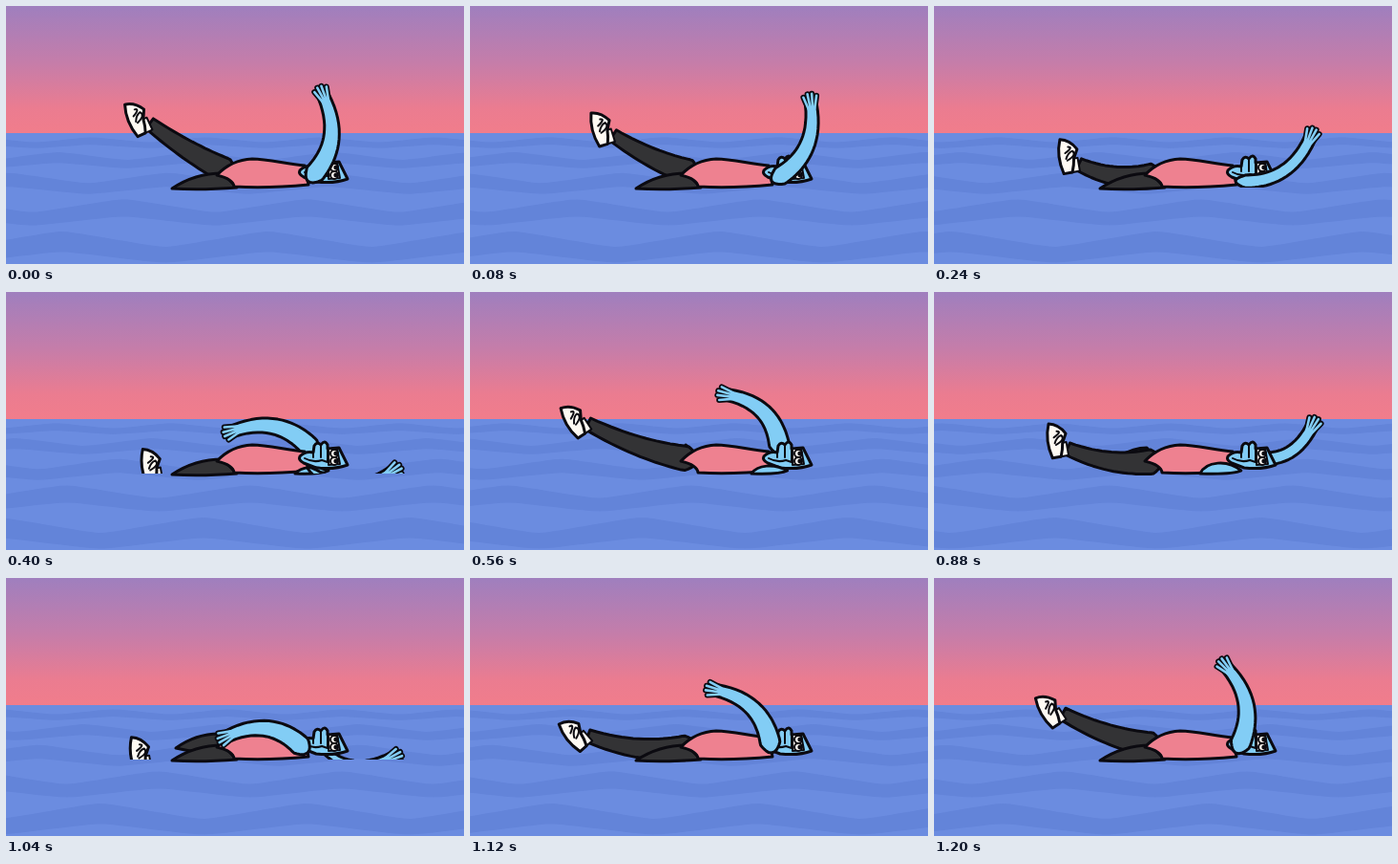
An HTML page for the animation above (1280 ms loop, 480 by 270 pixels).

```html
<!DOCTYPE html>
<html lang="en">
<head>
<meta charset="utf-8">
<title>Backstroke</title>
<style>
html, body { margin: 0; width: 100%; height: 100%; overflow: hidden; background: #6a8adf; }
svg { display: block; width: 100vw; height: 100vh; }
.ink { stroke: #0b0a10; stroke-width: 3; stroke-linejoin: round; stroke-linecap: round; }
.thin { stroke-width: 2; }
</style>
</head>
<body>
<svg viewBox="0 0 480 270" preserveAspectRatio="none">
  <defs>
    <linearGradient id="sky" x1="0" y1="0" x2="0" y2="1">
      <stop offset="0" stop-color="#9f7fbe"/>
      <stop offset=".45" stop-color="#c67da9"/>
      <stop offset=".8" stop-color="#eb7c90"/>
      <stop offset="1" stop-color="#f17d8b"/>
    </linearGradient>
    <clipPath id="air"><path d="M0 0H480V190H0Z"/></clipPath>
  </defs>
  <rect width="480" height="134" fill="url(#sky)"/>
  <rect y="133" width="480" height="137" fill="#6b8ce0"/>
  <path id="waves" fill="#6384d9"/>
  <g id="swimmer"></g>
</svg>
<script>
const STEP = 80, COUNT = 16;
const BLUE = '#82cdf5', PINK = '#ee8190', DARK = '#333335', WHITE = '#fffaf3';
const waves = document.getElementById('waves');
const swimmer = document.getElementById('swimmer');

// The far arm enters half a loop after the near one; angles are in degrees over the stroke.
const ARMS = {
  near: { start: 13, x: 316, y: 183, sweep: [[0, 170], [.25, 97], [1, -6]] },
  far: { start: 5, x: 325, y: 170, sweep: [[0, 156], [.5, 90], [.75, 26], [1, -6]] }
};
const LEGS = { near: { start: 5.5, reach: 122 }, far: { start: 13.5, reach: 110 } };

const mix = (a, b, u) => a + (b - a) * u;
const rad = deg => deg * Math.PI / 180;
const since = (start, step) => (step - start + COUNT) % COUNT;
const ink = (d, fill, more = '') => `<path class="ink ${more}" d="${d}" fill="${fill}"/>`;
const inAir = parts => `<g clip-path="url(#air)">${parts}</g>`;

function ramp(points, u) {
  const i = Math.max(1, points.findIndex(p => p[0] >= u));
  const [a, b] = [points[i - 1], points[i]];
  return mix(a[1], b[1], (u - a[0]) / (b[0] - a[0]));
}

// Outline of a quadratic curve a-c-b, round at the body end and narrowing to the tip
function taper(a, c, b, wide, slim) {
  const left = [], right = [], n = 24;
  for (let i = 0; i <= n; i++) {
    const u = (i / n) ** 1.5, v = 1 - u;
    const pos = j => v * v * a[j] + 2 * u * v * c[j] + u * u * b[j];
    const dir = j => v * (c[j] - a[j]) + u * (b[j] - c[j]);
    const r = mix(wide, slim, u) / 2 * Math.sqrt(Math.min(1, u * 10)) / Math.hypot(dir(0), dir(1));
    const x = pos(0), y = pos(1), nx = -dir(1) * r, ny = dir(0) * r;
    left.push((x + nx).toFixed(1) + ' ' + (y + ny).toFixed(1));
    right.unshift((x - nx).toFixed(1) + ' ' + (y - ny).toFixed(1));
  }
  return 'M' + left.concat(right).join('L') + 'Z';
}

// The wrist follows an ellipse; the elbow bows to the same side all the way.
function arm({ start, x, y, sweep }, step) {
  const u = since(start, step) / 8;
  if (u > 1) return '';
  const angle = ramp(sweep, u);
  const wx = 318 + 86 * Math.cos(rad(angle)), wy = 180 - 86 * Math.sin(rad(angle));
  const bow = 32 / Math.hypot(wx - x, wy - y);
  const cx = (x + wx) / 2 - (wy - y) * bow, cy = (y + wy) / 2 + (wx - x) * bow;
  const wide = 6 + 16 * Math.sin(rad(Math.max(0, Math.min(angle, 90))));
  const turn = Math.atan2(wy - cy, wx - cx) * 180 / Math.PI;

  let fingers = '';
  for (let i = -1.5; i <= 1.5; i++) fingers += `M-4 ${i * 2.2}L${12 - i * i * 1.4} ${i * 4.6}`;
  const hand = (color, w) => `<path transform="translate(${wx} ${wy}) rotate(${turn})" d="${fingers}" ` +
    `fill="none" stroke="${color}" stroke-width="${w}" stroke-linecap="round"/>`;
  return inAir(hand('#0b0a10', 6) + ink(taper([x, y], [cx, cy], [wx, wy], wide, 12), BLUE) + hand(BLUE, 2.6));
}

const kick = (leg, step) => since(leg.start, step) / 7.5;

// A quick rise, then a slower fall until only the toe is left
function leg(side, step) {
  const v = kick(side, step);
  if (v > 1) return '';
  const hip = [238, 176];
  const lift = ramp([[0, 0], [.35, 35], [1, -10]], v);
  const reach = side.reach + 4 - 42 * v;
  const ax = hip[0] - 4 - reach * Math.cos(rad(lift)), ay = hip[1] + 2 - reach * Math.sin(rad(lift));
  const sag = 6 + .35 * (35 - lift);
  const turn = mix(-135, -100, Math.min(1, v * 1.7));
  const shin = taper(hip, [(hip[0] + ax) / 2, (hip[1] + ay) / 2 + sag], [ax, ay], 27, 13);
  const foot = `<g transform="translate(${ax} ${ay}) rotate(${turn})">` +
    ink('M-7 -9H7V0H-7Z', WHITE, 'thin') +
    ink('M-7 -17Q12 -22 29 -15Q27 -5 16 1L7 -4Q0 -5 -7 -8Z', WHITE) +
    ink('M6 -11Q10 0 15 -4Q14 -9 8 -12M14 -12Q19 -2 20 -8', 'none', 'thin') + '</g>';
  return (v < .95 ? ink(shin, DARK) : '') + inAir(foot);
}

function thigh(x, y, top, right, base) {
  return ink(`M${x} ${y}Q${mix(x, right, .35)} ${top} ${right - 15} ${top}L${right} ${base}Q${x + 30} ${base + 3} ${x} ${y}Z`, DARK);
}

function farThigh(step) {
  const left = 13 - step;
  return kick(LEGS.far, step) > 1 ? thigh(178 + 8 * left, 178 - 3 * left, 163, 238, 182) : '';
}

function nearThigh(step) {
  return kick(LEGS.near, step) >= 1 ? thigh(174, 191, 175, 242, 190) : '';
}

// The near shoulder drifts towards the hip while its arm is under water.
function shoulder(step) {
  const u = since(5, step);
  if (u > 7) return '';
  const a = 303 - 4 * u, b = 338 - 2.7 * u, top = 183 - u;
  return ink(`M${a} 190C${a + 6} ${top} ${b - 14} ${top - 2} ${b} 187Q${b - 8} 191 ${a} 190Z`, BLUE);
}

const torso = ink('M221 177Q236 161 258 160C276 160 295 166 313 167L317 187Q275 191 239 189Q238 181 221 177Z', PINK);

const eye = y => `<circle class="ink thin" cx="344" cy="${y}" r="4" fill="${WHITE}"/>` +
  `<circle cx="345.5" cy="${y}" r="2.2" fill="#0b0a10"/>`;
const head =
  ink('M308 172Q314 166 322 168L323 161Q326 156 330 160Q334 154 337 160V164L349 163L358 181Q345 186 325 184L312 179Q306 176 308 172Z', BLUE) +
  ink('M338 164H347L350 180L338 181Z', WHITE, 'thin') + eye(169) + eye(177) +
  ink('M330 160V173M322 168V173M313 174Q322 179 331 176L337 178V161', 'none', 'thin');

// Wide zigzag bands that grow towards the viewer and drift one length per loop
function wavePath(step) {
  let d = '';
  for (let row = 0; row < 5; row++) {
    const y = 140 + row * 14 + row * row * 3, h = 7 + row * 3;
    const length = 120 + row * 24, swing = 2 + row;
    const edge = [[], []];
    for (let x = -8; x <= 488; x += 8) {
      const p = (x / length + step / COUNT + row * .37) * Math.PI * 2;
      const rise = Math.asin(Math.sin(p) * .97) * swing;
      edge[0].push(x + ' ' + (y + rise).toFixed(1));
      edge[1].unshift(x + ' ' + (y + h + rise * .7).toFixed(1));
    }
    d += 'M' + edge.flat().join('L') + 'Z';
  }
  return d;
}

function draw(step) {
  waves.setAttribute('d', wavePath(step));
  swimmer.innerHTML = arm(ARMS.far, step) + leg(LEGS.far, step) + farThigh(step) +
    leg(LEGS.near, step) + nearThigh(step) + torso + head + shoulder(step) + arm(ARMS.near, step);
}

let shown = -1;
const start = performance.now();
function tick() {
  const step = Math.floor((performance.now() - start) / STEP) % COUNT;
  if (step !== shown) draw(shown = step);
  requestAnimationFrame(tick);
}
tick();
</script>
</body>
</html>
```
